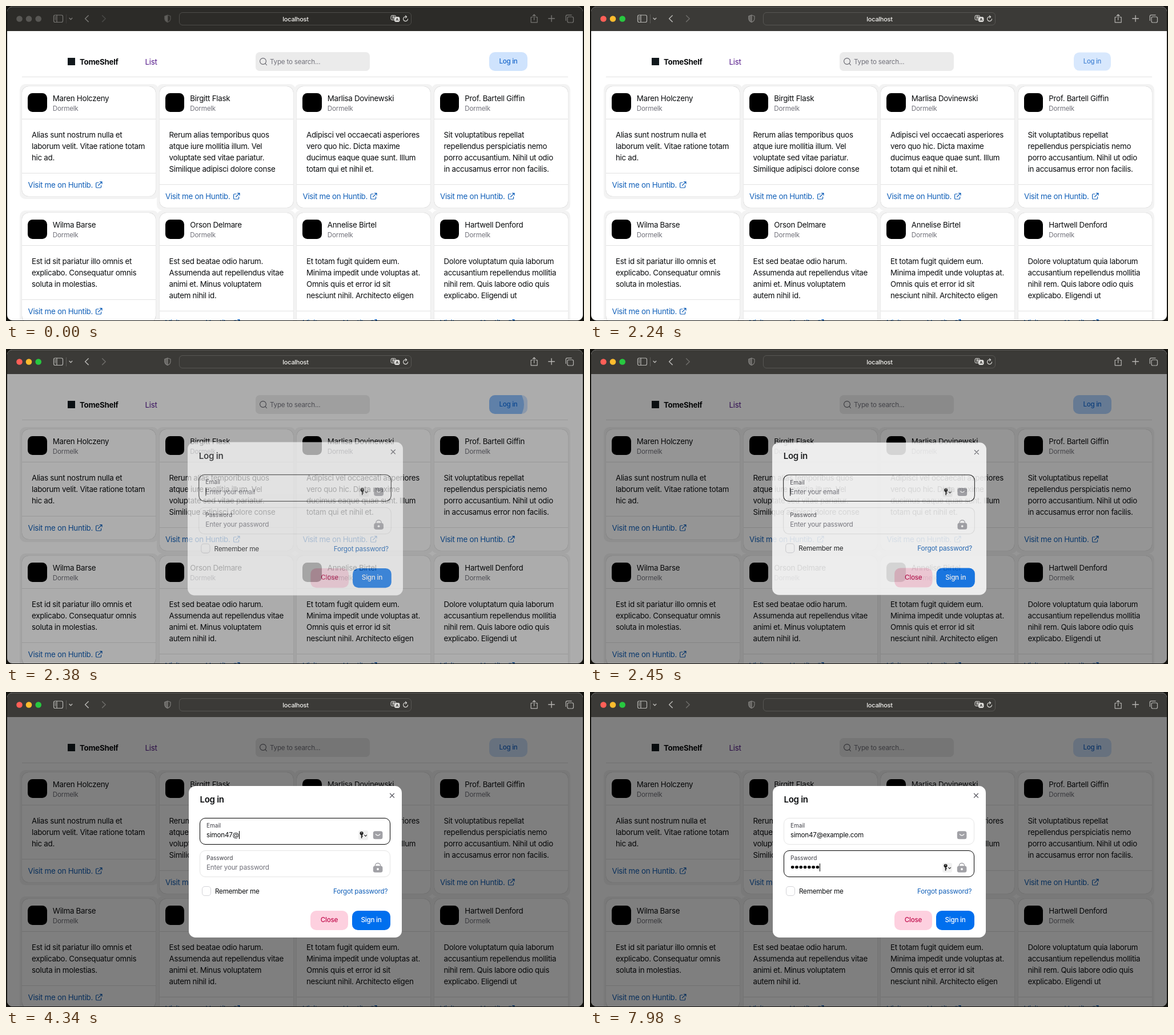
Write an HTML page that moves like this. It is 1012 px wide and 553 px high and loops after 8000 ms.

```html
<!DOCTYPE html>
<html lang="en">
<head>
<meta charset="utf-8">
<title>Book list with log in dialog</title>
<style>
  html, body { margin: 0; width: 100%; height: 100%; overflow: hidden; background: #14130f; }
  body { font: 13.33px/20px Inter, "Open Sans", sans-serif; letter-spacing: -.021em; color: #0a0c0e; }
  div, svg { position: absolute; box-sizing: border-box; }
  .t { white-space: pre; height: 20px; }
  .s { font-size: 11.67px; letter-spacing: -.018em; }
  .c { text-align: center; }
  .fill { inset: 0; }
  svg { left: 0; top: 0; overflow: visible; fill: none; stroke-linecap: round; stroke-linejoin: round; }

  #stage { left: 0; top: 0; width: 1012px; height: 553px; overflow: hidden; }
  #win { inset: 0; clip-path: inset(1px 2px 1px 2px round 9px); background: #fff; }
  #page { isolation: isolate; }
  #bar { left: 0; top: 0; width: 1012px; height: 44px; background: #2c2b28; --icon: #777673; }
  #rim { inset: 1px 2px; border-radius: 9px; border-top: 1px solid rgba(255,255,255,.25); }
  #bar svg { stroke: var(--icon); stroke-width: 1.2; }
  #bar .light { fill: #585754; stroke: none; }
  #url { left: 302.5px; top: 11px; width: 407.5px; height: 23px; border: 1px solid #4d4c49; border-radius: 6px; }
  #bar.active { background: #3b3a37; --icon: #b6b5b2; }
  #bar.active #url { border-color: #575653; }
  #bar.active .light:nth-of-type(1) { fill: #ff5f57; }
  #bar.active .light:nth-of-type(2) { fill: #febc2e; }
  #bar.active .light:nth-of-type(3) { fill: #28c840; }

  .rule { height: 1px; background: #e2e2e2; }
  #search { left: 437px; top: 81px; width: 200px; height: 33px; border-radius: 7px; background: #ebebeb; }
  .btn { height: 33.3px; border-radius: 10px; overflow: hidden; font-size: 11.67px; line-height: 33px; font-weight: 500; text-align: center; }
  #login { left: 846px; top: 81px; width: 67px; background: #cfe3fd; color: #1a68cb; }
  #ripple { left: -6.5px; top: -17px; width: 67px; height: 67px; border-radius: 50%; background: #006fee; }

  .card { width: 234px; border-radius: 12px; background: #fff; box-shadow: 0 0 1px rgba(0,0,0,.35); }
  .card::before { content: ""; position: absolute; inset: -4px -4.5px -5.5px; z-index: -1; border-radius: 10px; background: #f3f3f3; }
  .avatar { width: 33.4px; height: 33.4px; border-radius: 8.5px; background: #000; }
  .link { color: #105fb8; }
  .muted { color: #71717a; }

  #shade { left: 0; top: 44px; width: 1012px; height: 509px; background: #000; }
  #modal { inset: 0; transform-origin: 506px 298px; }
  #sheet { left: 319.5px; top: 164.5px; width: 373px; height: 266.5px; border-radius: 11.7px; background: #fff; }
  .field { left: 339.3px; width: 333.4px; height: 46.8px; border: 1.7px solid; border-radius: 10px; }
  .label { font-size: 10px; color: #3f3f46; letter-spacing: 0; }
  #check { left: 342.5px; top: 341.3px; width: 16.6px; height: 16.6px; border: 1.6px solid #d4d4d8; border-radius: 5px; }
  #close { left: 532.7px; top: 384.4px; width: 66.5px; background: #fdd0df; color: #c20e4d; }
  #sign { left: 606px; top: 384.4px; width: 67px; background: #006fee; color: #fff; }
  .caret { display: inline-block; width: 1px; height: 14px; margin-right: -1px; background: #000; vertical-align: -3px; }
  #dots { left: 351px; top: 304px; height: 7.3px; background: radial-gradient(circle, #000 2.6px, transparent 3.1px) 0 0 / 7.3px 7.3px; }
  #key { left: 617px; top: 243px; width: 17px; height: 17px; border-radius: 3px; background: #f1f1f1; }
  #menu { left: 345px; top: 319.5px; width: 153px; height: 49.5px; border-radius: 5px; background: #5f5f5f; color: #fff; font-size: 11px; box-shadow: 0 0 1px #333, 0 2px 7px 1px rgba(0,0,0,.22); }
  #pick { left: 6px; top: 6px; width: 141px; height: 18.5px; border-radius: 3px; background: #4a8ef0; }
</style>
</head>
<body>
<div id="stage">
  <div id="win">
    <div id="page" class="fill">
      <div id="mark" style="left:108px;top:91px;width:13px;height:13px;background:#11181c"></div>
      <div class="t" style="left:129px;top:88px;font-weight:700">TomeShelf</div>
      <div class="t" style="left:243.5px;top:88px;color:#551a8b">List</div>
      <div id="search"></div>
      <svg width="1" height="1" stroke="#62626a" stroke-width="1.1"><circle cx="450" cy="97" r="5.4"/><path d="M454 101l2.4 2.6"/></svg>
      <div class="t s muted" style="left:462px;top:88px">Type to search...</div>
      <div id="login" class="btn"><div id="ripple"></div>Log in</div>
      <div class="rule" style="left:28px;top:124px;width:956px"></div>
    </div>

    <div id="shade"></div>

    <div id="modal">
      <div id="sheet"></div>
      <div class="t" style="left:339.5px;top:179px;font-size:15px;font-weight:600">Log in</div>
      <div class="field" id="mailBox" style="top:221.3px"></div>
      <div class="field" id="passBox" style="top:278px"></div>
      <div class="t label" style="left:351px;top:224px">Email</div>
      <div class="t label" style="left:351px;top:281px">Password</div>
      <div class="t s muted" id="mailHint" style="left:351px;top:241px">Enter your email</div>
      <div class="t s muted" id="passHint" style="left:351px;top:298px">Enter your password</div>
      <div class="t s" style="left:351px;top:241px"><span id="mail"></span><span class="caret" id="mailCaret"></span></div>
      <div id="dots"></div>
      <div class="t s" id="passText" style="top:298px"><span class="caret" id="passCaret"></span></div>
      <svg width="1" height="1">
        <path d="M672.5 178.2l7 7m0-7l-7 7" stroke="#5f5f67" stroke-width="1.3"/>
        <rect x="642.8" y="244.3" width="16.6" height="14" rx="3.5" fill="#a1a1a6"/>
        <path d="M647.3 249.6q3.8 4.6 7.6 0" stroke="#fff" stroke-width="1.2"/>
        <path d="M646.4 306v-1.2a4.6 4.3 0 0 1 9.2 0v1.2" stroke="#a1a1a6" stroke-width="1.3"/>
        <rect x="642.8" y="305.3" width="16.6" height="11.4" rx="3.5" fill="#a1a1a6"/>
        <circle cx="651" cy="311" r="1.9" fill="#fff"/>
      </svg>
      <div id="key"><svg width="1" height="1" stroke="#222">
        <circle cx="5.6" cy="5" r="3.1" fill="#222" stroke="none"/><circle cx="5.6" cy="4" r=".8" fill="#f1f1f1" stroke="none"/>
        <path d="M5.6 7v6M6 10h1.2" stroke-width="1.7"/><path d="M10.6 8.2l2 2 2-2" stroke-width="1.1"/>
      </svg></div>
      <div id="check"></div>
      <div class="t s" style="left:366px;top:339.5px">Remember me</div>
      <div class="t s link" style="left:573px;top:339.5px">Forgot password?</div>
      <div id="close" class="btn">Close</div>
      <div id="sign" class="btn">Sign in</div>
      <div id="menu">
        <div id="pick"></div>
        <div class="t" style="left:12px;top:5.5px">Contraseñas...</div>
        <div class="t" style="left:12px;top:24px">Sugerir contraseña nueva</div>
      </div>
    </div>

    <div id="bar">
      <div id="url"></div>
      <svg width="1" height="1">
        <circle class="light" cx="23.5" cy="22.5" r="5.3"/><circle class="light" cx="40" cy="22.5" r="5.3"/><circle class="light" cx="56.7" cy="22.5" r="5.3"/>
        <rect x="83.5" y="16" width="16" height="12.5" rx="2.5"/><path d="M89 16v12.5M85.5 19h1.6m-1.6 2.5h1.6m-1.6 2.5h1.6"/>
        <path d="M105.5 15v15" opacity=".25"/><path d="M111 21.3l2.4 2.4 2.4-2.4" stroke-width="1.5"/>
        <path d="M144.2 16.8l-5.6 5.4 5.6 5.4" stroke-width="1.5"/><path d="M168.6 16.8l5.6 5.4-5.6 5.4" stroke-width="1.5" opacity=".4"/>
        <g opacity=".55"><path d="M283 16l5 1.8v4.4q0 4-5 6.3-5-2.3-5-6.3v-4.4z"/><path d="M283 16l-5 1.8v4.4q0 4 5 6.3z" fill="#8b8a87"/></g>
        <g stroke="#dddcd9" stroke-width="1"><rect x="674" y="16.5" width="8.5" height="8" rx="2"/><path d="M676 19h4.5m-2.2-1v1m-1.8 3.5q3-1 3.4-3.5m-2.8 1q.6 1.8 2.6 2.6"/>
          <rect x="680.5" y="19.5" width="8.5" height="8" rx="2" fill="#dddcd9"/><path d="M683 25.6l1.8-4.4 1.8 4.4m-3-1.4h2.4" stroke="#3b3a37"/></g>
        <path d="M701.6 19.2a4 4 0 1 0 2 3.6M699.4 17l2.4 2.2-2.4 2" stroke="#dddcd9" stroke-width="1.1"/>
        <path d="M922 19.5h-2.8v9.3h11v-9.3h-2.8M924.7 24.5v-9.5m-2.6 2.4l2.6-2.6 2.6 2.6"/>
        <path d="M949.8 22h10.6M955.1 16.7v10.6" stroke-width="1.4"/>
        <rect x="983" y="19" width="10.5" height="10" rx="2.2"/><path d="M980.3 25.5v-7.4q0-2.3 2.3-2.3h7.6"/>
      </svg>
      <div class="t c" style="left:303px;width:408px;top:12.5px;font-size:11px;font-weight:500;color:#f1f0ed">localhost</div>
    </div>
    <div id="rim"></div>
  </div>
</div>

<script>
const $ = id => document.getElementById(id);

const cards = [
  ["Maren Holczeny", "Alias sunt nostrum nulla et", "laborum velit. Vitae ratione totam", "hic ad."],
  ["Birgitt Flask", "Rerum alias temporibus quos", "atque iure mollitia illum. Vel", "voluptate sed vitae pariatur.", "Similique adipisci dolore conse"],
  ["Marlisa Dovinewski", "Adipisci vel occaecati asperiores", "vero quo hic. Dicta maxime", "ducimus eaque quae sunt. Illum", "totam qui et nihil et."],
  ["Prof. Bartell Giffin", "Sit voluptatibus repellat", "repellendus perspiciatis nemo", "porro accusantium. Nihil ut odio", "in accusamus error non facilis."],
  ["Wilma Barse", "Est id sit pariatur illo omnis et", "explicabo. Consequatur omnis", "soluta in molestias."],
  ["Orson Delmare", "Est sed beatae odio harum.", "Assumenda aut repellendus vitae", "animi et. Minus voluptatem", "autem nihil id."],
  ["Annelise Birtel", "Et totam fugit quidem eum.", "Minima impedit unde voluptas at.", "Omnis quis et error id sit", "nesciunt nihil. Architecto eligen"],
  ["Hartwell Denford", "Dolore voluptatum quia laborum", "accusantium repellendus mollitia", "nihil rem. Quis labore odio quis", "explicabo. Eligendi ut"]
];

const text = (x, mid, str, cls = "") =>
  `<div class="t ${cls}" style="left:${x}px;top:${mid - 10}px">${str}</div>`;
const rule = y => `<div class="rule" style="left:0;top:${y}px;width:100%"></div>`;

function cardHtml([name, ...lines], i) {
  const x = 28 + (i % 4) * 240.5;
  const y = i < 4 ? 141 : 363.4;
  const foot = 91.5 + lines.length * 20;
  return `<div class="card" style="left:${x}px;top:${y}px;height:${foot + 41}px">
    <div class="avatar" style="left:10.2px;top:12px"></div>
    ${text(53.8, 21, name)}${text(53.8, 39, "Dormelk", "s muted")}${rule(57)}
    ${lines.map((s, n) => text(17, 85 + n * 20, s)).join("")}${rule(foot)}
    ${text(10.5, foot + 21, "Visit me on Huntib.", "link")}
    <svg width="1" height="1" stroke="#105fb8" stroke-width="1.2" style="left:129px;top:${foot + 15}px">
      <path d="M5 2H2.2Q.6 2 .6 3.6V9.4Q.6 11 2.2 11H8Q9.6 11 9.6 9.4V7M4.6 7L11 .6M7.4.6H11V4.2"/></svg>
  </div>`;
}
$("page").insertAdjacentHTML("beforeend", cards.map(cardHtml).join(""));

const LOOP = 8000, TICK = 70;
const address = "simon47@example.com";
const mailKeys = [3080, 3150, 3220, 3290, 3290, 3850, 3920, 4340, 4620, 4830,
  4970, 5040, 5110, 5250, 5390, 5530, 5740, 5810, 5880];
const passKeys = [6790, 6930, 7000, 7140, 7630, 7840, 7980];

const typed = (keys, t) => keys.filter(k => k <= t).length;
const ramp = (t, from, dur) => Math.min(1, Math.max(0, (t - from) / dur));
const show = (id, on) => { $(id).style.visibility = on ? "inherit" : "hidden"; };
const border = focus => {
  const v = Math.round(228 * (1 - focus));
  return `rgb(${v},${v},${v})`;
};

function render(time) {
  const t = Math.floor(time / TICK) * TICK;
  $("bar").classList.toggle("active", t >= 630);

  const hover = t >= 910 && t < 2310;
  $("login").style.opacity = hover ? .8 : 1;
  $("login").style.transform = hover && t >= 2100 ? "scale(.97)" : "none";
  const wave = ramp(t, 2240, 280);
  $("ripple").style.transform = `scale(${wave * 2})`;
  $("ripple").style.opacity = .65 * (1 - wave);

  const open = 1 - (1 - ramp(t, 2244, 462)) ** 3;
  $("shade").style.opacity = open / 2;
  $("modal").style.opacity = open;
  $("modal").style.transform = open < 1 ? `scale(${1.03 - .03 * open})` : "none";

  const focus = ramp(t, 6040, 200);
  const onPass = t >= 6090;
  $("mailBox").style.borderColor = border(1 - focus);
  $("passBox").style.borderColor = border(focus);
  $("key").style.top = onPass ? "299.5px" : "243px";

  const chars = typed(mailKeys, t), dots = typed(passKeys, t);
  $("mail").textContent = address.slice(0, chars);
  $("dots").style.width = dots * 7.3 + "px";
  $("passText").style.left = 351 + dots * 7.3 + "px";
  show("mailHint", !chars);
  show("passHint", !dots);
  show("mailCaret", !onPass);
  show("passCaret", onPass && !(t >= 6580 && t < 6790));
  show("menu", t >= 6160 && t < 6790);
}

const start = performance.now();
function frame() {
  render((performance.now() - start) % LOOP);
  requestAnimationFrame(frame);
}
frame();
</script>
</body>
</html>
```
